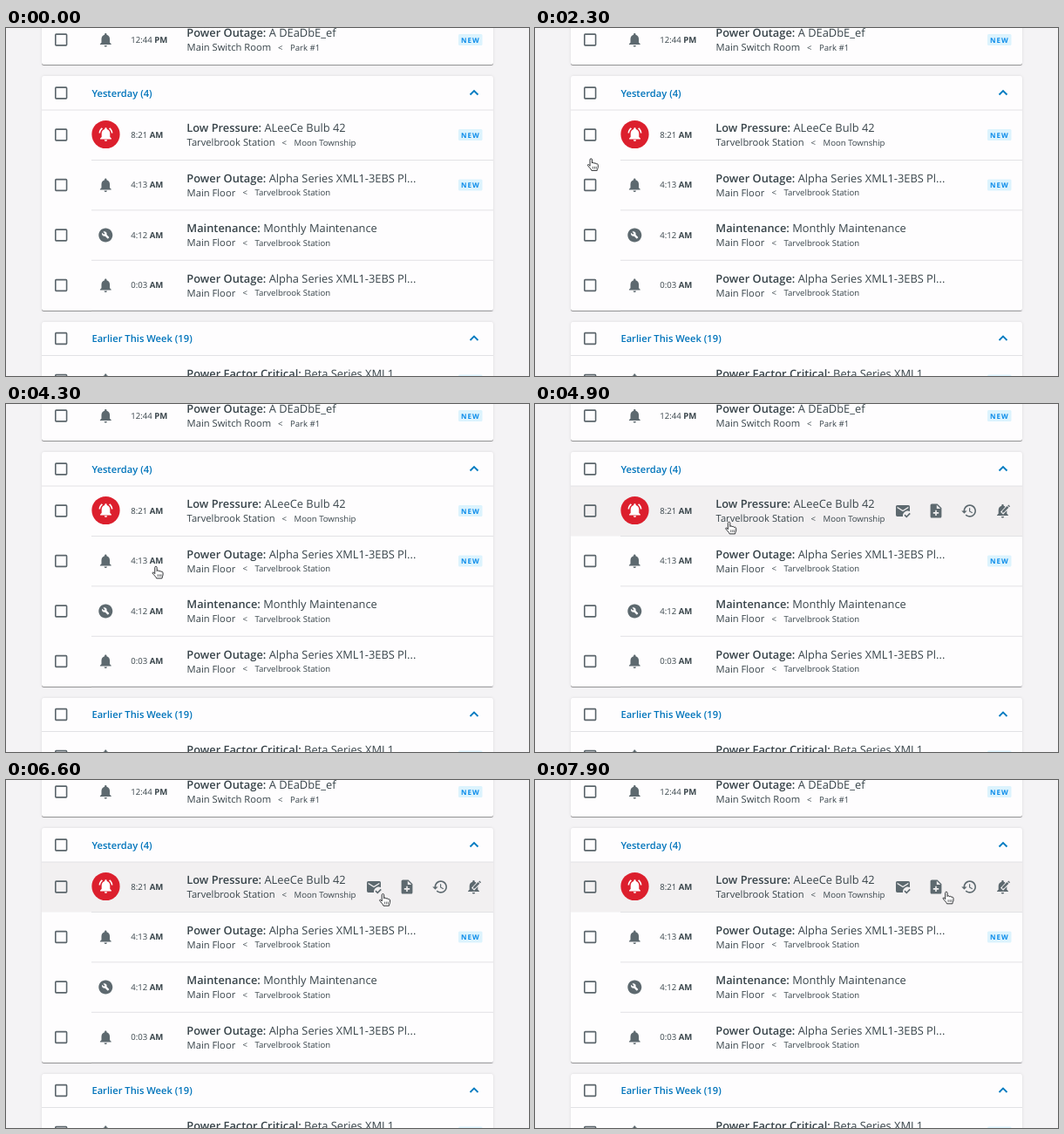
Animation, 600 px wide and 399 px high, one loop 8000 ms. Source, as an HTML page:

```html
<!DOCTYPE html>
<html lang="en">
<head>
<meta charset="utf-8">
<title>Alarm list</title>
<style>
  html, body { margin: 0; width: 100%; height: 100%; overflow: hidden; background: #f4f3f5; }
  svg { display: block; width: 600px; height: 399px; font-family: "Open Sans", "Noto Sans", sans-serif; fill: #38444a; text-rendering: geometricPrecision; }
  .card { fill: #fefdfe; filter: drop-shadow(0 1px .7px rgba(0, 0, 0, .36)) drop-shadow(0 0 1.5px rgba(0, 0, 0, .1)); }
  .line { stroke: #e2e2e5; stroke-width: 1; }
  .icon { fill: #5d696f; }
  .box { fill: none; stroke: #5b656b; stroke-width: 2; }
  .title { font-size: 12.85px; }
  .place { font-size: 11.2px; }
  .small { font-size: 9.6px; }
  .bold { font-weight: 600; }
  .time { font-weight: 700; }
  .head { font-size: 11.2px; font-weight: 600; fill: #0074bb; }
  .chev { fill: none; stroke: #007bc1; stroke-width: 1.8; }
  .badge { fill: #dcf3fd; }
  .new { font-size: 8px; font-weight: 700; letter-spacing: 1px; fill: #0a8bea; }
  .hover { fill: #f2f0f1; }
  .halo { fill: #efeef0; }
  .hand { fill: #fff; stroke: #25282b; stroke-width: .95; stroke-linejoin: round; }
  .hand .folds { fill: none; stroke-width: .7; }
</style>
</head>
<body>
<svg id="stage" viewBox="0 0 600 399"></svg>
<script>
const bell = 'M12 22c1.1 0 2-.9 2-2h-4c0 1.1.89 2 2 2zm6-6v-5c0-3.07-1.64-5.64-4.5-6.32V4c0-.83-.67-1.5-1.5-1.5s-1.5.67-1.5 1.5v.68C7.63 5.36 6 7.92 6 11v5l-2 2v1h16v-1l-2-2z';
const waves = 'M7.58 4.08L6.15 2.65C3.75 4.48 2.17 7.3 2.03 10.5h2c.15-2.65 1.51-4.97 3.55-6.42zm12.39 6.42h2c-.15-3.2-1.73-6.02-4.12-7.85l-1.42 1.43c2.02 1.45 3.39 3.77 3.54 6.42z';
const wrench = 'M12 2C6.48 2 2 6.48 2 12s4.48 10 10 10 10-4.48 10-10S17.52 2 12 2zm4.9 13.49l-1.4 1.4c-.2.2-.51.2-.71 0l-3.41-3.41c-1.22.43-2.64.17-3.62-.81-1.11-1.11-1.3-2.79-.59-4.1l2.35 2.35 1.41-1.41-2.35-2.34c1.32-.71 2.99-.52 4.1.59.98.98 1.24 2.4.81 3.62l3.41 3.41c.19.19.19.51 0 .7z';
const mail = 'M12 19c0-3.87 3.13-7 7-7 1.08 0 2.09.25 3 .68V6c0-1.1-.9-2-2-2H4c-1.1 0-2 .9-2 2v12c0 1.1.9 2 2 2h8.08c-.05-.33-.08-.66-.08-1zM4 6l8 5 8-5v2l-8 5-8-5V6zm13.34 16l-3.54-3.54 1.41-1.41 2.12 2.12 4.24-4.24L23 16.34 17.34 22z';
const note = 'M14 2H6c-1.1 0-1.99.9-1.99 2L4 20c0 1.1.89 2 1.99 2H18c1.1 0 2-.9 2-2V8l-6-6zm2 14h-3v3h-2v-3H8v-2h3v-3h2v3h3v2zm-3-7V3.5L18.5 9H13z';
const clock = 'M13 3c-4.97 0-9 4.03-9 9H1l3.89 3.89.07.14L9 12H6c0-3.87 3.13-7 7-7s7 3.13 7 7-3.13 7-7 7c-1.93 0-3.68-.79-4.94-2.06l-1.42 1.42C8.27 19.99 10.51 21 13 21c4.97 0 9-4.03 9-9s-4.03-9-9-9zm-1 5v5l4.28 2.54.72-1.21-3.5-2.08V8H12z';

const at24 = (x, y, body) => `<g transform="translate(${x} ${y}) scale(.8) translate(-12 -12)">${body}</g>`;
const icon = (x, y, d, extra = '') => at24(x, y, `<path class="icon" d="${d}" ${extra}/>`);
const text = (x, y, cls, str) => `<text x="${x}" y="${y}" class="${cls}">${str}</text>`;
const line = (x, y) => `<path class="line" d="M${x} ${y}H559"/>`;
const card = (y, h) => `<rect class="card" x="41" y="${y}" width="518" height="${h}" rx="2.5"/>`;
const checkbox = y => at24(63.2, y, '<rect class="box" x="4" y="4" width="16" height="16" rx="1"/>');

const badge = y => `<rect class="badge" x="519" y="${y - 6.5}" width="27.5" height="13" rx="1.5"/>` +
  text(522, y + 3, 'new', 'NEW');

const header = (y, label) => checkbox(y) + text(98.4, y + 4.3, 'head', label) +
  `<path class="chev" d="M532.5 ${y + 2}l4.5 -4.5l4.5 4.5"/>` + line(41, y + 19.5);

const alarm = y => `<circle cx="114.5" cy="${y - .5}" r="16.1" fill="#dc1f2d"/>` +
  icon(114.5, y - .7, bell + waves, 'style="fill:#fff"');

function row(y, r) {
  return checkbox(y) +
    (r.alarm ? alarm(y) : icon(114.3, y, r.icon || bell)) +
    text(143.2, y + 3.4, 'small', `${r.time} <tspan class="time">${r.half || 'AM'}</tspan>`) +
    text(207.3, y - 3.5, 'title', `<tspan class="bold">${r.kind}:</tspan> ${r.name}`) +
    text(207.6, y + 12.5, 'place', r.place) +
    text(r.sub - 14, y + 12.3, 'small', '&lt;') +
    text(r.sub, y + 12.3, 'small', r.site);
}

const site = 'Tarvelbrook Station';
const rowY = i => 122.5 + 57.5 * i;
const outage = time => ({ time, kind: 'Power Outage', name: 'Alpha Series XML1-3EBS Pl...', place: 'Main Floor', sub: 285.5, site });
const rows = [
  { alarm: true, time: '8:21', kind: 'Low Pressure', name: 'ALeeCe Bulb 42', place: site, sub: 330.5, site: 'Moon Township' },
  outage('4:13'),
  { icon: wrench, time: '4:12', kind: 'Maintenance', name: 'Monthly Maintenance', place: 'Main Floor', sub: 285.5, site },
  outage('0:03')
];

// Bell with a pencil cutting into its upper right
const editBell = icon(536.5, 122.5, bell) + at24(536.5, 122.5,
  '<path d="M10.8 15.4L22 3.6" stroke="#f2f0f1" stroke-width="5.2"/>' +
  '<path d="M11.2 14.8l.5-2.7L18.4 5.2l2.2 2.2l-6.7 6.9zM19.2 4.4l1.3-1.3l2.2 2.2l-1.3 1.3z" class="icon"/>');

document.getElementById('stage').innerHTML =
  card(-20, 62) + card(55, 269) + card(337, 90) +
  '<rect id="hover" class="hover" x="41" y="94" width="518" height="57.5"/>' +
  '<circle id="halo" class="halo" cx="63.2" r="16"/>' +
  row(13.5, { time: '12:44', half: 'PM', kind: 'Power Outage', name: 'A DEaDbE_ef', place: 'Main Switch Room', sub: 326, site: 'Park #1' }) +
  badge(13.5) +
  header(74.5, 'Yesterday (4)') +
  rows.map((r, i) => row(rowY(i), r) + line(98, 151.5 + 57.4 * i)).join('') +
  `<g id="fresh">${badge(122.5)}</g>` + badge(180) +
  `<g id="actions">${icon(422, 122.5, mail)}${icon(460, 122.5, note)}${icon(498, 122.5, clock)}${editBell}</g>` +
  header(356, 'Earlier This Week (19)') +
  row(404, { time: '11:20', kind: 'Power Factor Critical', name: 'Beta Series XML1', place: '', sub: 285, site: '' }) +
  badge(404) +
  '<g id="hand" class="hand"><path d="M3.4 9.2V2C3.4 .3 5.8 .3 5.8 2V6C6 5 8.1 5 8.2 6.4C8.5 5.6 10.4 5.7 10.5 7C11 6.4 12.7 6.6 12.7 8.2V10.5C12.7 12 11.6 12.6 11.6 14.4H5.2C5 12.8 1.6 10 .9 8.6C.4 7.3 2 6.8 3.4 9.2Z"/>' +
  '<path class="folds" d="M6.8 9.8v2.7M8.8 9.8v2.7M10.6 9.8v2.7"/></g>';

// Pointer moves: start, duration, target x, target y, sideways bow
const moves = [
  [650, 950, 56.5, 118.5, 0],
  [1920, 1300, 57, 297, 6],
  [3690, 1010, 217.8, 134.5, 0],
  [4880, 1030, 424.6, 130, 0],
  [6440, 780, 463, 127.5, 0],
  [7710, 800, 501, 127, 0]
];
const ease = p => p < .5 ? 2 * p * p : 1 - 2 * (1 - p) ** 2;

function pointer(t) {
  let x = -16, y = 170;
  for (const [start, dur, tx, ty, bow] of moves) {
    if (t <= start) break;
    const p = ease(Math.min(1, (t - start) / dur));
    x += (tx - x) * p + bow * Math.sin(Math.PI * p);
    y += (ty - y) * p;
  }
  return [x, y];
}

const [hand, hover, halo, fresh, actions] =
  ['hand', 'hover', 'halo', 'fresh', 'actions'].map(id => document.getElementById(id));
const show = (el, on) => el.setAttribute('visibility', on ? 'visible' : 'hidden');

function draw(now) {
  const t = Math.floor(now % 8000 / 100) * 100;
  const [x, y] = pointer(t);
  const tipX = x + 4.6, tipY = y + 1;
  hand.setAttribute('transform', `translate(${x.toFixed(2)} ${y.toFixed(2)})`);

  const inRow = tipX > 98 && tipY > 94 && tipY < 151.5;
  show(hover, inRow);
  show(actions, inRow);
  show(fresh, !inRow);

  const near = rows.findIndex((r, i) => Math.hypot(tipX - 63.2, tipY - rowY(i)) < 16);
  show(halo, near >= 0);
  if (near >= 0) halo.setAttribute('cy', rowY(near));
}

const begin = performance.now();
function tick() {
  draw(performance.now() - begin);
  requestAnimationFrame(tick);
}
tick();
</script>
</body>
</html>
```
